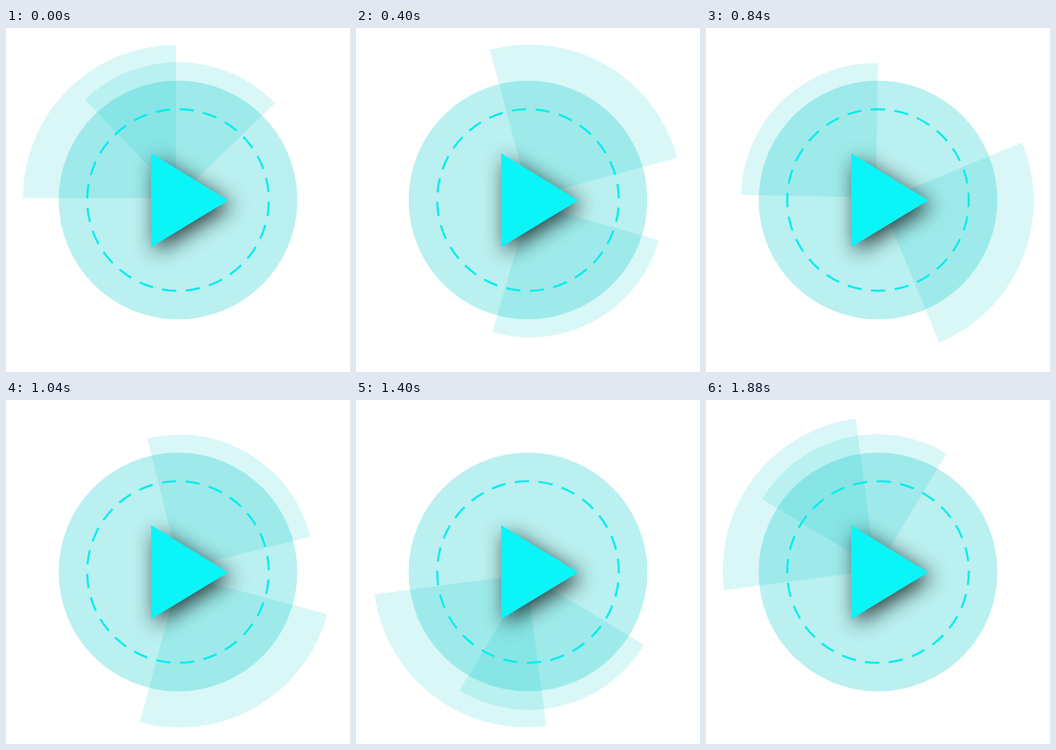
These frames come from a looping animation (500 by 500 pixels, 1920 ms). An HTML page with a canvas:

```html
<!DOCTYPE html>
<html lang="en">
<head>
<meta charset="utf-8">
<title>Play button</title>
<style>
html, body { margin: 0; width: 100%; height: 100%; overflow: hidden; background: #fff; }
canvas { display: block; width: 500px; height: 500px; }
</style>
</head>
<body>
<canvas id="stage" width="500" height="500"></canvas>
<script>
const ctx = document.getElementById('stage').getContext('2d');
const LOOP = 1920, STEP = 40, C = 250;
const CYAN = '#0af5f7';
const rad = deg => deg * Math.PI / 180;
const tint = alpha => `rgba(0,200,200,${alpha})`;

function disc() {
  ctx.fillStyle = tint(0.27);
  ctx.beginPath();
  ctx.arc(C, C, 173.5, 0, 2 * Math.PI);
  ctx.fill();
}

// Upper-left quarter, its tip slightly off the pivot
function wedge(radius, tip, deg) {
  ctx.save();
  ctx.translate(C, C);
  ctx.rotate(rad(deg));
  ctx.fillStyle = tint(0.15);
  ctx.beginPath();
  ctx.moveTo(-tip, -tip);
  ctx.arc(-tip, -tip, radius, Math.PI, 1.5 * Math.PI);
  ctx.fill();
  ctx.restore();
}

function ring(deg) {
  ctx.strokeStyle = '#08ecee';
  ctx.lineWidth = 3;
  for (let i = 0; i < 24; i++) {
    const a = deg - 90 + i * 15;
    ctx.beginPath();
    ctx.arc(C, C, 132, rad(a), rad(a + 9.1));
    ctx.stroke();
  }
}

function arrow() {
  ctx.save();
  ctx.shadowColor = 'rgba(0,0,0,0.75)';
  ctx.shadowBlur = 30;
  ctx.shadowOffsetX = 6;
  ctx.shadowOffsetY = 8;
  ctx.fillStyle = CYAN;
  ctx.beginPath();
  ctx.moveTo(211, 182);
  ctx.lineTo(323, 250.5);
  ctx.lineTo(211, 318.5);
  ctx.fill();
  ctx.restore();
}

function draw(ms) {
  const t = Math.floor((ms % LOOP) / STEP) * STEP / LOOP;
  ctx.fillStyle = '#fff';
  ctx.fillRect(0, 0, 500, 500);
  disc();
  wedge(222.3, 3, 360 * t);
  wedge(195.3, 3.6, 46.1 + 720 * t);
  ring(1 + 90 * t);
  arrow();
}

const start = performance.now();
function tick() {
  draw(performance.now() - start);
  requestAnimationFrame(tick);
}
tick();
</script>
</body>
</html>
```
